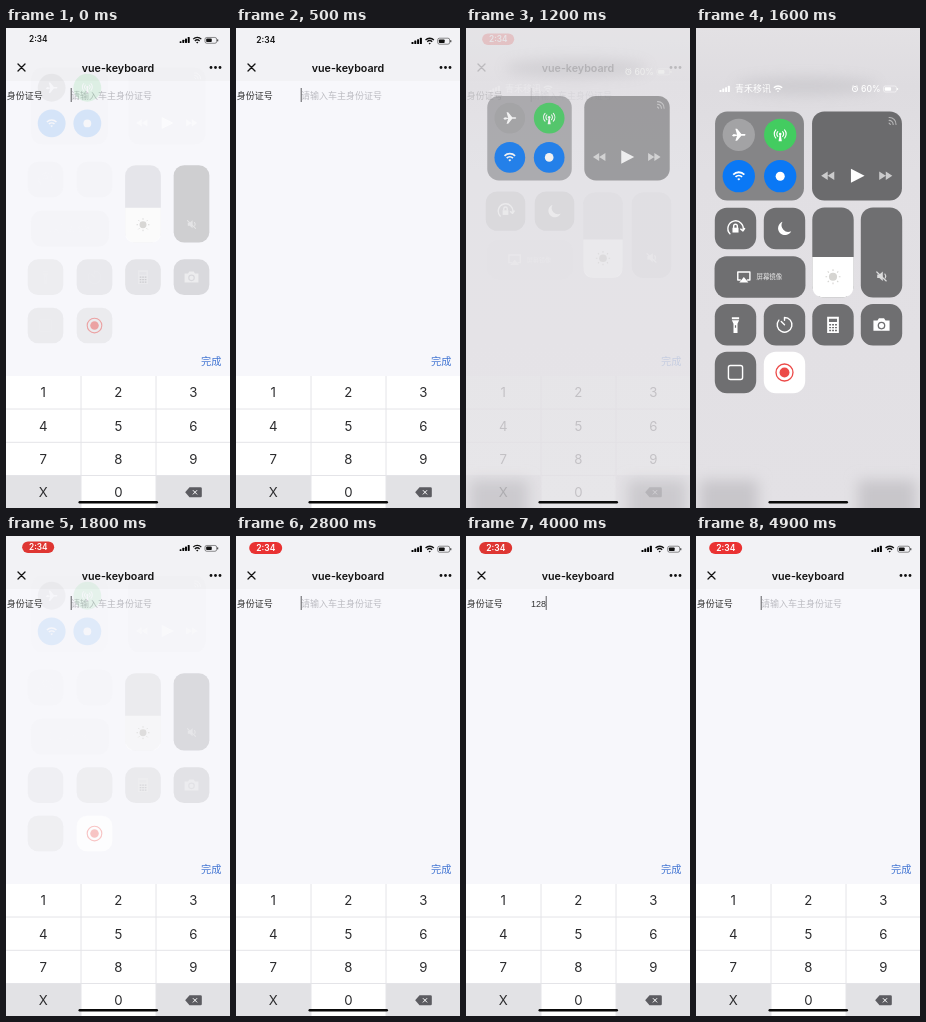
Write an HTML page that moves like this. It is 224 px wide and 480 px high and loops after 5000 ms.

```html
<!DOCTYPE html>
<html lang="zh">
<head>
<meta charset="utf-8">
<style>
html, body { margin: 0; width: 100%; height: 100%; overflow: hidden; background: #f7f7fb; }
svg { display: block; width: 100vw; height: 100vh; }
text { font-family: Inter, "Noto Sans CJK SC", "Noto Sans CJK", sans-serif; }
.cjk { font-family: "Noto Sans CJK SC", "Noto Sans CJK", "Noto Sans CJK JP", sans-serif; }
.mid { text-anchor: middle; }
.line { fill: none; stroke: #fff; stroke-width: 1.4; stroke-linecap: round; stroke-linejoin: round; }
</style>
</head>
<body>
<svg id="stage" viewBox="0 0 224 480">
  <defs>
    <linearGradient id="haze" x1="0" y1="0" x2="0" y2="1">
      <stop offset="0" stop-color="#e3e1e4"/>
      <stop offset="0.12" stop-color="#dedce0"/>
      <stop offset="0.3" stop-color="#e1dfe3"/>
      <stop offset="1" stop-color="#e3e1e5"/>
    </linearGradient>
    <filter id="soft" x="-50%" y="-100%" width="200%" height="300%"><feGaussianBlur stdDeviation="7"/></filter>
  </defs>
  <rect width="224" height="480" fill="#f7f7fb"/>
  <rect width="224" height="53" fill="#f2f2f5"/>
  <path d="M12 36l7 7m0-7l-7 7" stroke="#111" stroke-width="1.3" stroke-linecap="round"/>
  <text x="112" y="43.5" class="mid" font-size="10.7" font-weight="600" fill="#111">vue-keyboard</text>
  <g fill="#111"><circle cx="205" cy="39.5" r="1.4"/><circle cx="209.5" cy="39.5" r="1.4"/><circle cx="214" cy="39.5" r="1.4"/></g>
  <g id="bar">
    <rect id="pill" x="13.2" y="6" width="33" height="12" rx="6"/>
    <text id="hour" x="29.8" y="15.1" class="mid" font-size="8.5" font-weight="600">2:34</text>
    <g id="status"></g>
  </g>
  <text x="0.7" y="70.5" class="cjk" font-size="9" fill="#333">身份证号</text>
  <text id="hint" x="65" y="70.5" class="cjk" font-size="9" fill="#bcbcc2">请输入车主身份证号</text>
  <text id="value" x="65" y="70.5" font-size="9" fill="#333" style="font-family:'Liberation Sans',sans-serif"></text>
  <rect id="caret" y="60" width="1" height="14" fill="#5c5c60"/>
  <text x="205.3" y="337.2" class="cjk mid" font-size="10.2" fill="#3f73d2">完成</text>
  <g id="keys"></g>
  <g id="veil">
    <rect width="224" height="480" fill="url(#haze)"/>
    <g fill="#c8c6ca" filter="url(#soft)"><rect x="4" y="452" width="58" height="45"/><rect x="162" y="452" width="58" height="45"/></g>
  </g>
  <ellipse id="shade" cx="110" cy="8" rx="72" ry="9" fill="#8b8b90" filter="url(#soft)"/>
  <g id="panel"></g>
  <g id="topLeft"></g>
  <g id="topRight"></g>
  <rect x="72.5" y="473.1" width="79.5" height="2.4" rx="1.2" fill="#0a0a0a"/>
</svg>
<script>
const $ = id => document.getElementById(id);
const LOOP = 5000;
const clamp = v => Math.max(0, Math.min(1, v));
const ramp = (t, a, b) => clamp((t - a) / (b - a));
const ease = v => v * v * (3 - 2 * v);
const mix = (a, b, k) => a + (b - a) * k;
const alpha = (node, a) => node.setAttribute('opacity', a.toFixed(3));

// Small glyphs, centred on the origin
const bars = [0, 1, 2, 3].map(i =>
  `<rect x="${i * 2.8 - 5.5}" y="${1 - i * 1.4}" width="2" height="${2 + i * 1.4}" rx=".5"/>`).join('');
const wifi = (s, c) => `<g transform="scale(${s})" fill="none" stroke="${c}" stroke-width="1.4">
  <path d="M-4.4 -1.3A6.2 6.2 0 0 1 4.4 -1.3M-2.6 .6A3.7 3.7 0 0 1 2.6 .6"/>
  <path d="M-1.2 2.2A1.7 1.7 0 0 1 1.2 2.2L0 3.5Z" fill="${c}" stroke="none"/></g>`;
const cell = (w, full) => `<rect x="${-w / 2}" y="-3" width="${w}" height="6" rx="1.8" fill="none" stroke="currentColor" stroke-width=".8" opacity=".6"/>
  <rect x="${1.2 - w / 2}" y="-1.8" width="${(w - 2.4) * full}" height="3.6" rx=".8" fill="currentColor"/>
  <path d="M${w / 2 + 1.1} -1v2" stroke="currentColor" stroke-width=".9"/>`;
const at = (x, y, s) => `<g transform="translate(${x} ${y})">${s}</g>`;
const small = (k, s) => `<g transform="scale(${k})">${s}</g>`;
const disc = (x, y, c, s) => at(x, y, `<circle r="16" fill="${c}"/>${s}`);
const line = d => `<path class="line" d="${d}"/>`;
const white = d => `<path fill="#fff" fill-rule="evenodd" d="${d}"/>`;

$('status').innerHTML = at(181, 13, bars) + at(193.7, 13.2, wifi(.95, '#111')) +
  at(207.7, 13.2, `<g color="#111">${cell(12, .6)}</g>`);
$('topLeft').innerHTML = `<g fill="#fff">${at(29, 61, bars)}
  <text x="39" y="64.3" class="cjk" font-size="9" font-weight="500">青禾移讯</text></g>` + at(82, 61, wifi(.95, '#fff'));
$('topRight').innerHTML = `<g fill="currentColor">
  <circle cx="159" cy="61" r="2.6" fill="none" stroke="currentColor"/>
  <path d="M159 59.6v1.6h1.2M156.2 58.4l1.3-1M161.8 58.4l-1.3-1" fill="none" stroke="currentColor" stroke-width=".8"/>
  <text x="165" y="64.2" font-size="8.6" font-weight="500">60%</text></g>` + at(194, 61, cell(13, .6));

// Keypad
const cols = [37.3, 112.3, 187.3], rows = [364.5, 398, 431, 464.5];
let pad = `<rect y="348" width="224" height="132" fill="#fff"/>
  <path d="M0 447.5h75v32.5h-75zM150 447.5h74v32.5h-74z" fill="#e2e2e5"/>
  <path d="M0 381H224M0 414.3H224M0 447.5H224M75 348V480M150 348V480" stroke="#e4e4e8"/>`;
['1', '2', '3', '4', '5', '6', '7', '8', '9', 'X', '0'].forEach((k, i) => {
  pad += `<text x="${cols[i % 3]}" y="${rows[Math.floor(i / 3)] + 4.9}" class="mid" font-size="13.2" fill="#2c2c2e">${k}</text>`;
});
pad += at(187.5, 464.3, `<path d="M-8.3 0L-4 -5H7Q8.3 -5 8.3 -3.7V3.7Q8.3 5 7 5H-4Z" fill="#5c5c61"/>
  <path d="M-.6 -2.1L3.6 2.1M3.6 -2.1L-.6 2.1" stroke="#fff" stroke-width="1"/>`);
$('keys').innerHTML = pad;

// Control tiles: x, y, w, h, fill, tile ghost, icon ghost, icon
const G = '#6f6f71';
const skip = '<g opacity=".65">' + white('M-6.5 -4.2L0 0L-6.5 4.2ZM0 -4.2L6.5 0L0 4.2Z') + '</g>';
const rays = Array.from({ length: 8 }, (_, i) => {
  const a = i * Math.PI / 4, c = Math.cos(a), s = Math.sin(a);
  return `M${c * 5.8} ${s * 5.8}L${c * 7.4} ${s * 7.4}`;
}).join('');
const tiles = [
  [19.5, 84, 88, 88, '#858587', .015, .13,
    disc(-20.5, -21, '#a3a3a5', small(.85, white('M-8 1L-6 -1L-2 0L-4 -7L-2 -7L3 -1L7 -1Q9 0 7 1L3 1L-2 7L-4 7L-2 1L-6 2Z'))) +
    disc(20.5, -21, '#43cc60', small(.8, white('M-.7 0H.7L2 8H-2Z') + '<circle cy="-1" r="1.6" fill="#fff"/>' +
      line('M-3 2A4.2 4.2 0 0 1 -3 -4M3 2A4.2 4.2 0 0 0 3 -4M-5.4 4A7.4 7.4 0 0 1 -5.4 -6M5.4 4A7.4 7.4 0 0 0 5.4 -6'))) +
    disc(-20.5, 20, '#0a78f5', wifi(1.25, '#fff')) +
    disc(20.5, 20, '#0a78f5', '<circle r="4.5" fill="#fff"/>')],
  [116.5, 84, 89, 88, '#6b6b6d', .015, .7,
    at(28.5, 19.5, skip) + at(-29, 19.5, small('-1 1', skip)) +
    white('M-6 12.5L7.5 19.5L-6 26.5Z') +
    at(35, -34.5, small(.8, '<g opacity=".5">' + line('M-4 -4.5A8 8 0 0 1 4.5 4M-4 -1A5 5 0 0 1 1 4M-4 2.5l1.5 1.5') + '</g>'))],
  [19, 180, 41, 41, G, .025, .04,
    line('M-5.5 5.2A7.6 7.6 0 1 1 7.4 2M5.2 0.6L7.4 2.4L9 0') + white('M-3 -.8H3V4H-3Z') + line('M-1.8 -1V-2.4A1.8 1.8 0 0 1 1.8 -2.4V-1')],
  [68, 180, 41, 41, G, .025, .04, white('M-2 -6.6A6.8 6.8 0 1 0 6.6 2.6A6.6 6.6 0 0 1 -2 -6.6Z')],
  [116.5, 180, 41, 89, G, .13, .85,
    white('M-20.5 4.5H20.5V32.5Q20.5 44.5 8.5 44.5H-8.5Q-20.5 44.5 -20.5 32.5Z') +
    at(0, 24, `<circle r="4" fill="#d6d5d2"/><path d="${rays}" stroke="#d6d5d2" stroke-width="1.1"/>`)],
  [165, 180, 41, 89, G, .3, .6,
    at(0, 23.5, '<g opacity=".75">' + small(.85, white('M-5 -2H-2.5L1.5 -5.5V5.5L-2.5 2H-5Z') + line('M-5.5 -5L5.5 5.5M4 -2.5A4 4 0 0 1 4.4 2')) + '</g>')],
  [19, 228.5, 90, 41, G, .025, .04,
    line('M-19.5 3H-22V-5H-10V3H-12.5') + white('M-16 0L-11.5 5.5H-20.5Z') +
    '<text class="cjk" x="-3.5" y="2.4" font-size="6.4" fill="#fff" opacity=".85">屏幕镜像</text>'],
  [19, 276.3, 41, 41, G, .08, .08, white('M-3.6 -7.5H3.6V-5.6H-3.6ZM-3.6 -4.6H3.6L2 -1V8H-2V-1ZM-.6 .5V3H.6V.5Z')],
  [68, 276.3, 41, 41, G, .1, .08, line('M0 -7.3A7.3 7.3 0 1 1 -5.6 -4.6M0 -7.3V-4.5M-3.2 -3.2L0 0')],
  [116.5, 276.3, 41, 41, G, .14, .2,
    white('M-5.8 -8H5.8V8H-5.8ZM-4 -6V-2.8H4V-6Z') +
    '<path d="M-3.8 0H4M-3.8 2.8H4M-3.8 5.6H4" stroke="#6f6f71" stroke-width="1.4" stroke-dasharray="1.9 1"/>'],
  [165, 276.3, 41, 41, G, .22, .5,
    white('M-8 -4.2H-4L-2.5 -6.5H2.5L4 -4.2H8V6H-8ZM-3.8 .8A3.8 3.8 0 1 0 3.8 .8A3.8 3.8 0 1 0 -3.8 .8ZM-2.5 .8A2.5 2.5 0 1 0 2.5 .8A2.5 2.5 0 1 0 -2.5 .8Z')],
  [19, 324, 41, 41, G, .09, .08, '<rect class="line" x="-7" y="-7" width="14" height="14" rx="2"/>'],
  [68, 324, 41, 41, '#fff', .75, .45,
    '<circle r="8.4" fill="none" stroke="#ec4a48" stroke-width="1.3"/><circle r="4.9" fill="#ec4a48"/>']
].map(([x, y, w, h, fill, ghost, iconGhost, icon]) => {
  const g = document.createElementNS('http://www.w3.org/2000/svg', 'g');
  g.innerHTML = `<rect x="${-w / 2}" y="${-h / 2}" width="${w}" height="${h}" rx="12" fill="${fill}"/><g>${icon}</g>`;
  $('panel').append(g);
  return { g, box: g.firstChild, icon: g.lastChild, cx: x + w / 2, cy: y + h / 2, ghost, iconGhost };
});
const record = tiles[tiles.length - 1];

function drawPanel(t) {
  const first = t < 700, opening = !first && t < 1600;
  const open = t < 1600 ? ease(ramp(t, 980, 1350)) : 1 - ease(ramp(t, 1610, 1790));
  const fade = first ? 1 - ramp(t, 0, 450) : 1 - ramp(t, 1800, 2250);
  const shut = first ? 1 : ease(ramp(t, 1610, 1790));
  const thin = first ? 1 : .7;
  for (const m of tiles) {
    const lag = (m.cy - 128) * 1.6;
    const rise = ramp(t, 950 + lag, 1250 + lag);
    const ghost = m !== record ? m.ghost * thin : first ? .09 : m.ghost;
    alpha(m.box, opening ? rise ** 3 : mix(1, ghost, shut) * fade);
    alpha(m.icon, opening ? rise : mix(1, m.iconGhost * thin, shut) * fade);
    const lift = (1 - open) * (-50 + (m.cy - 128) * .014);
    m.g.setAttribute('transform', `translate(${m.cx} ${m.cy + lift}) scale(${mix(.87, 1.01, open)})`);
  }
  record.box.setAttribute('fill', first ? G : '#fff');
  const veil = t < 1600 ? ease(ramp(t, 980, 1280)) : 1 - ease(ramp(t, 1610, 1790));
  alpha($('veil'), veil);
  alpha($('shade'), (t < 1600 ? ramp(t, 860, 1000) : veil) * .2);
  $('shade').setAttribute('transform', `translate(0 ${50 * open})`);
  alpha($('topLeft'), t < 1600 ? ramp(t, 1150, 1350) : 1 - ramp(t, 1610, 1720));
  const right = $('topRight'), tone = Math.round(mix(205, 255, open));
  alpha(right, t < 1600 ? ramp(t, 880, 1000) : 1 - ramp(t, 1610, 1740));
  right.setAttribute('color', `rgb(${tone},${tone},${tone})`);
  right.setAttribute('transform', `translate(${9.5 * (1 - open)} ${-48 * (1 - open)})`);
}

function drawInput(t) {
  const typed = [2960, 3260, 3560].filter(s => t >= s).length;
  const erased = [4260, 4460, 4660].filter(s => t >= s).length;
  const n = typed - erased;
  $('value').textContent = '128'.slice(0, n);
  alpha($('hint'), n ? 0 : 1);
  $('caret').setAttribute('x', 64.7 + 5 * n);
}

// The status bar shrinks a little while the panel is pulled down
function drawBar(t) {
  const live = t >= 700, beat = .5 + .5 * Math.cos((t - 1000) / 1000 * Math.PI);
  const pull = t < 700 ? 1 - ramp(t, 0, 450) : ramp(t, 850, 1000) * (1 - ease(ramp(t, 1800, 2250)));
  $('bar').setAttribute('transform', `translate(112 ${12 - .8 * pull}) scale(${1 - .03 * pull}) translate(-112 -12)`);
  alpha($('status'), t < 1600 ? 1 - ramp(t, 850, 970) : ramp(t, 1680, 1790));
  alpha($('pill'), live ? 1 : 0);
  $('pill').setAttribute('fill', `rgb(${Math.round(mix(222, 234, beat))},${Math.round(mix(54, 50, beat))},50)`);
  $('hour').setAttribute('fill', live ? '#fff' : '#111');
}

function draw(t) {
  drawPanel(t);
  drawInput(t);
  drawBar(t);
}

const start = performance.now();
function tick() {
  draw((performance.now() - start) % LOOP);
  requestAnimationFrame(tick);
}
draw(0);
requestAnimationFrame(tick);
</script>
</body>
</html>
```
